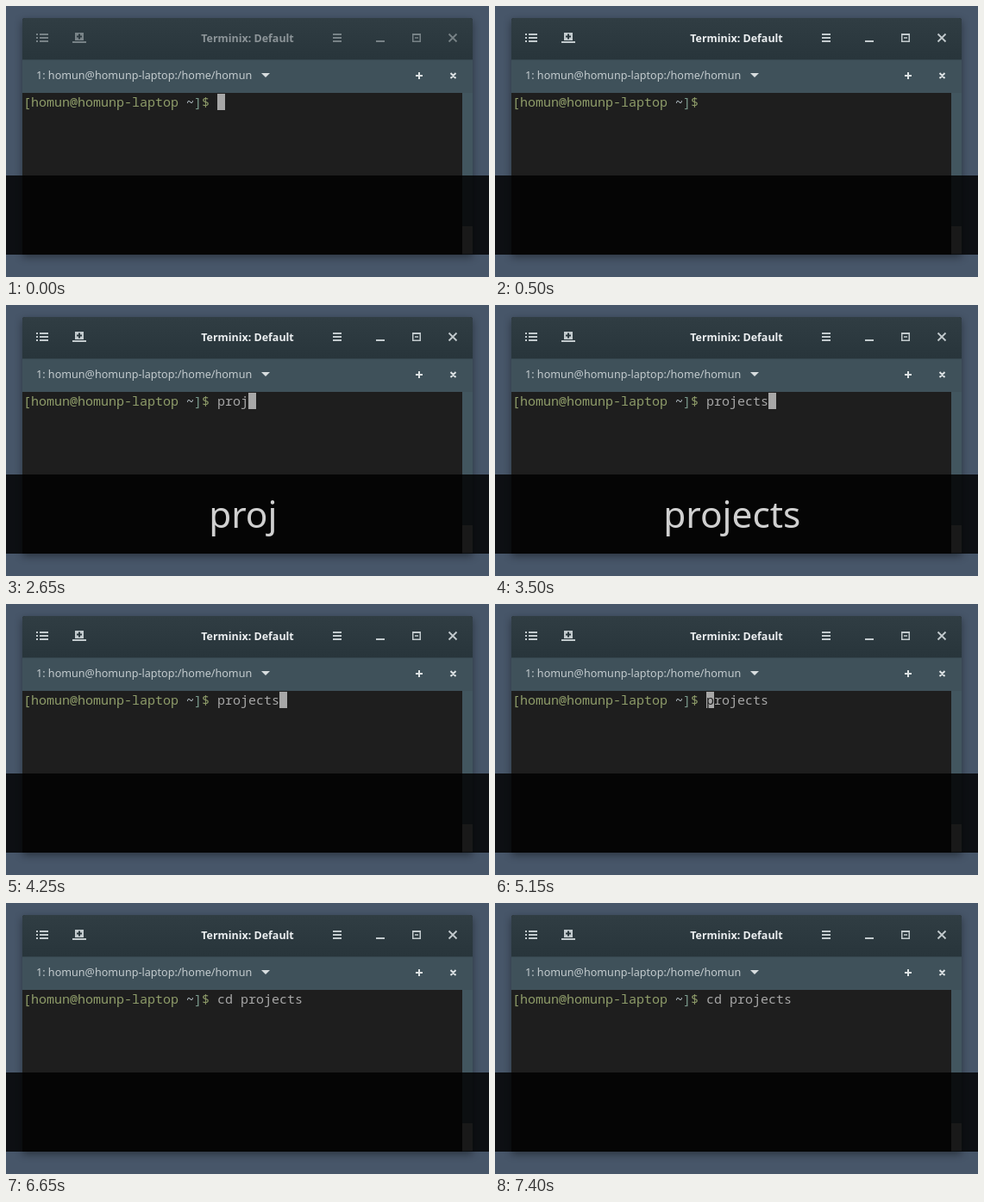
An HTML page for the animation above (8000 ms loop, 560x315 px).

```html
<!DOCTYPE html>
<html lang="en">
<head>
<meta charset="utf-8">
<title>Terminal typing</title>
<style>
  html, body { margin: 0; width: 100%; height: 100%; overflow: hidden; background: #475669; }
  svg { display: block; width: 100vw; height: 100vh; }
  text { white-space: pre; font-family: "Noto Sans", "Open Sans", sans-serif; }
  .mono { font: 15px "Noto Sans Mono", monospace; }
  .line { fill: none; stroke: #c3cbce; stroke-width: 2; }
  .win { filter: drop-shadow(0 3px 5px rgba(0, 0, 0, .4)); }
</style>
</head>
<body>
<svg viewBox="0 0 560 315">
  <defs>
    <linearGradient id="bar" x2="0" y2="1">
      <stop stop-color="#303d43"/><stop offset="1" stop-color="#28353b"/>
    </linearGradient>
  </defs>
  <rect width="560" height="315" fill="#475669"/>
  <path class="win" d="M19 289V17q0-3 3-3H538q3 0 3 3V289z" fill="#1e1e1e"/>
  <path d="M19 62V17q0-3 3-3H538q3 0 3 3V62z" fill="url(#bar)"/>
  <rect x="19" y="62" width="522" height="39" fill="#3f515a"/>
  <rect x="19" y="62" width="522" height="1" fill="#35454d"/>
  <rect x="529" y="101" width="12" height="188" fill="#42565f"/>

  <g id="header">
    <g class="line">
      <path d="M35 33h2m2 0h10M35 37h2m2 0h10M35 41h2m2 0h10"/>
      <path d="M379 33h10m-10 4h10m-10 4h10M429 41h10"/>
      <path d="M471 33h10"/>
      <path d="M471.75 34v7.25h8.5V34M474 37h4" stroke-width="1.5"/>
      <path d="M513.5 32.5l9 9m0-9l-9 9" stroke-width="1.8"/>
      <path d="M77 42h16"/>
    </g>
    <path d="M80 31h10v9H80z" fill="#c3cbce"/>
    <path d="M82 35.5h6m-3-3v6" stroke="#2c393f" stroke-width="2"/>
    <text x="280" y="42" text-anchor="middle" font-size="12.45" font-weight="700" fill="#eceff1">Terminix: Default</text>
  </g>

  <text x="35" y="85" font-size="12.6" fill="#c3cbce">1: homun@homunp-laptop:/home/homun</text>
  <path d="M296 78h10l-5 5z" fill="#d8dddf"/>
  <path class="line" d="M475 81h8m-4-4v8M515.5 78l6 6m0-6l-6 6" style="stroke:#dde2e4"/>

  <text class="mono" x="20" y="117" fill="#8f9d6a">[homun@homunp-laptop <tspan fill="#c3cfd6">~</tspan><tspan fill="#7a9a8c">]</tspan>$</text>
  <text class="mono" id="cmd" x="245" y="117" fill="#a7a7a7"></text>
  <g id="cursor">
    <rect y="102" width="9" height="19" fill="#a7a7a7"/>
    <text class="mono" id="under" y="117" fill="#1e1e1e"></text>
  </g>

  <rect y="197" width="560" height="92" fill="#000" fill-opacity=".82"/>
  <rect x="529" y="256" width="12" height="32" fill="#191919"/>
  <text id="keys" y="259" font-size="42.4" fill="#d0d0d0"></text>
  <rect id="recent" y="265" height="2" fill="#d0d0d0"/>
</svg>
<script>
const LOOP = 8000, OFF = -1, CENTER = 274.8;
const $ = id => document.getElementById(id);
const [header, cmd, cursor, under, keys, recent] =
  ["header", "cmd", "cursor", "under", "keys", "recent"].map($);

// [start ms, command, cursor column, shown keys, number of underlined keys]
const steps = [
  [0, "", 0, "", 0],
  [500, "", OFF, "", 0],
  [1150, "", 0, "", 0],
  [1750, "", OFF, "", 0],
  [2000, "p", 1, "p", 1],
  [2100, "p", 1, "p", 0],
  [2250, "pr", 2, "pr", 1],
  [2400, "pro", 3, "pro", 1],
  [2550, "proj", 4, "proj", 1],
  [2650, "proj", 4, "proj", 0],
  [2750, "projec", 6, "projec", 1],
  [2900, "projec", 6, "projec", 0],
  [3150, "project", 7, "project", 1],
  [3250, "project", 7, "project", 0],
  [3400, "projects", 8, "projects", 1],
  [3500, "projects", 8, "projects", 0],
  [3750, "projects", OFF, "projects", 0],
  [3900, "projects", OFF, "", 0],
  [4250, "projects", 8, "", 0],
  [4650, "projects", 0, "Ctrl+a\u2009", 7],
  [4750, "projects", 0, "Ctrl+a\u2009", 0],
  [5150, "projects", 0, "", 0],
  [5250, "projects", OFF, "", 0],
  [5500, "cprojects", 1, "c", 1],
  [5650, "cdprojects", 2, "cd", 1],
  [5750, "cdprojects", 2, "cd", 0],
  [6000, "cd projects", 3, "cd ", 1],
  [6250, "cd projects", 3, "cd ", 0],
  [6500, "cd projects", 3, "", 0],
  [6600, "cd projects", OFF, "", 0],
  [6750, "cd projects", 11, "Ctrl+e\u2009", 7],
  [6850, "cd projects", 11, "Ctrl+e\u2009", 0],
  [7250, "cd projects", 11, "", 0],
  [7400, "cd projects", OFF, "", 0],
];

function showKeys(label, count) {
  keys.textContent = label;
  const width = label ? keys.getComputedTextLength() : 0;
  const left = CENTER - width / 2;
  const start = label.length - count;
  const skip = count && start ? keys.getSubStringLength(0, start) : 0;
  keys.setAttribute("x", left);
  recent.setAttribute("x", left + skip);
  recent.setAttribute("width", count ? width - skip : 0);
}

function draw(t) {
  header.setAttribute("opacity", t < 150 ? .5 : t < 250 ? .75 : 1);
  const [, text, col, label, count] = steps.findLast(s => s[0] <= t);
  cmd.textContent = text;
  cursor.setAttribute("visibility", col === OFF ? "hidden" : "visible");
  cursor.setAttribute("transform", `translate(${245 + 9 * col})`);
  under.textContent = text[col] || "";
  showKeys(label, count);
}

const begin = performance.now();
function tick() {
  draw((performance.now() - begin) % LOOP);
  requestAnimationFrame(tick);
}
tick();
</script>
</body>
</html>
```
